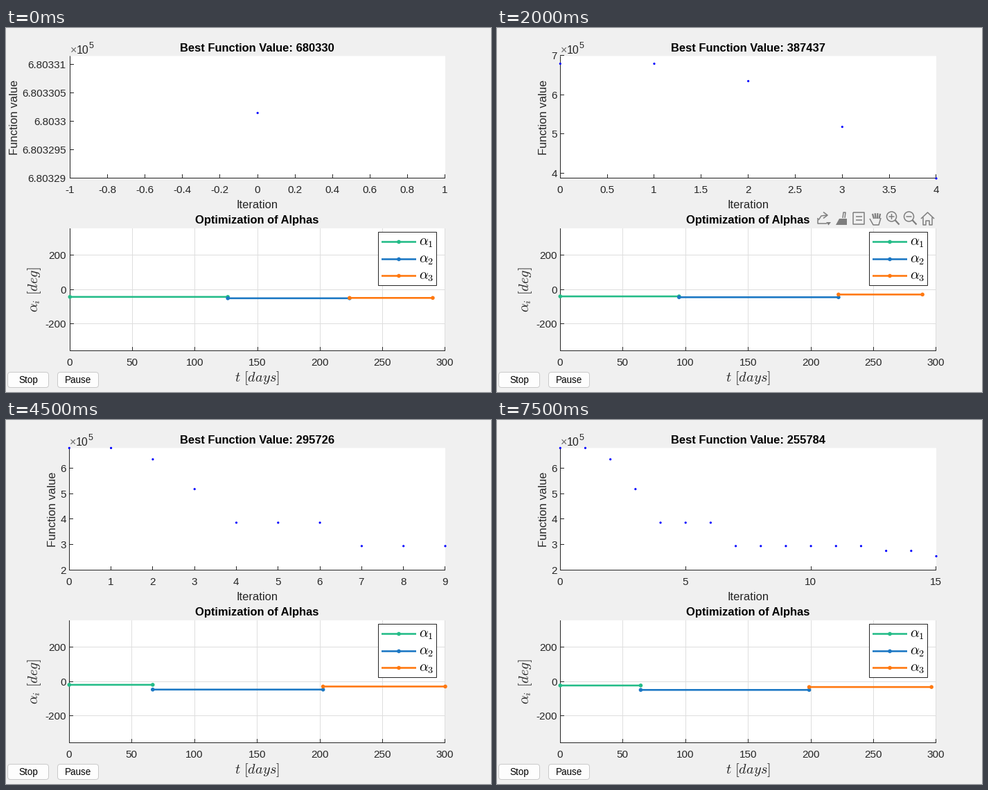
Animation, 700 px wide and 525 px high, one loop 8 s. Source, as a matplotlib script:

```python
import math

import matplotlib.pyplot as plt
import numpy as np
from matplotlib.animation import FuncAnimation
from matplotlib.patches import Circle, FancyBboxPatch, Polygon, Rectangle

plt.rcParams["font.family"] = "Liberation Sans"
plt.rcParams["mathtext.fontset"] = "cm"

W, H, DPI = 700, 525, 100
PT = 72 / DPI  # points per pixel
RIGHT, MID = 634, 362.5
INK, GRID, ICON = "#262626", "#dedede", "#7d7d7d"
COLORS = ("#24bc88", "#1c78c4", "#ff780f")
STEPS = (0.1, 0.2, 0.5, 1, 2, 5)
LAST = 15

# iteration of each improvement: new best value (x 1e5)
BEST = {0: 6.8033015, 2: 6.35928, 3: 5.19148, 4: 3.87437,
        7: 2.95726, 13: 2.76812, 15: 2.55784}

# key iterations: two switch days, end day, three angles
PLAN = {
    0: (126.2, 223.5, 290, -42, -50, -48),
    2: (116.6, 210.6, 289, -42, -49, -42),
    4: (94.8, 222, 289, -39, -44, -28),
    7: (66.6, 202.5, 300, -18, -46, -28),
    15: (64.2, 198.6, 296.2, -22, -48, -31),
}

fig = plt.figure(figsize=(W / DPI, H / DPI), dpi=DPI, facecolor="#f0f0f0")
ax = fig.add_axes((0, 0, 1, 1))


def improved(k):
    return max(i for i in BEST if i <= k)


def line(xs, ys, color=INK, lw=1, z=2):
    ax.plot(xs, ys, color=color, lw=lw * PT, solid_capstyle="butt",
            snap=False, zorder=z)


def dot(x, y, r, color):
    ax.add_patch(Circle((x, y), r, fc=color, ec="none", zorder=3))


def box(x, y, w, h, **kw):
    ax.add_patch(Rectangle((x, y), w, h, fc="white", snap=False, **kw))


def text(x, y, s, size, ha="center", color=INK, **kw):
    ax.text(x, y, s, fontsize=size * PT, ha=ha, va="baseline", color=color, **kw)


def vtext(x, y, s, size):
    text(x, y, s, size, rotation=90, rotation_mode="anchor")


def title(y, s):
    text(MID, y, s, 16.5, color="black", weight="bold")


def ticks(lo, hi, step):
    first = math.ceil(lo / step - 1e-6)
    last = math.floor(hi / step + 1e-6)
    return np.arange(first, last + 1) * step


def label(v):
    return f"{round(v, 9) + 0.0:.7g}"


def pixel(v):
    """Centre of the pixel that holds v."""
    return math.floor(v) + 0.5


def panel(k, top, bottom, xlim, xstep, ylim, ystep, grid=False):
    """Draw a plot area; return its x and y mappings and the label edge."""
    left = 92 if k < 2 else 91

    def px(v):
        return np.interp(v, xlim, (left + 0.3, RIGHT))

    def py(v):
        return np.interp(v, ylim, (bottom, top))

    box(left, top, RIGHT - left, bottom - top, ec="none", zorder=0)
    for v in ticks(*xlim, xstep):
        x = pixel(px(v) - 0.1)
        if grid:
            line([x, x], [top, bottom], GRID, z=1)
        line([x, x], [bottom - 6, bottom])
        text(px(v) - 0.5, bottom + 21, label(v), 15.2)
    edge = RIGHT
    for v in ticks(*ylim, ystep):
        y, s = pixel(py(v) - 0.5), label(v)
        if grid:
            line([left, RIGHT], [y, y], GRID, z=1)
        line([left, left + 6], [y, y])
        text(86.7, y + 5.5, s, 15.2, ha="right")
        edge = min(edge, 87 - sum(4.2 if c == "." else 8.4 for c in s))
    line([left + 0.5] * 2, [top, bottom])
    line([left, RIGHT], [bottom - 0.5] * 2)
    return px, py, edge


def x_range(k):
    if k == 0:
        return (-1, 1), 0.2
    step = 5 if k == LAST else next(s for s in STEPS if k <= 10 * s)
    return (0, math.ceil(k / step - 1e-6) * step), step


def y_range(k):
    lo, hi = BEST[improved(k)], BEST[0]
    if lo == hi:
        return (lo - 1.15e-5, hi + 1e-5), 5e-6
    step = next(s for s in STEPS if hi - lo < 5 * s)
    # wide ranges grow to a whole tick, downward once the best has halved
    if step >= 1:
        lo, hi = (math.floor(lo), hi) if lo < hi / 2 else (lo, math.ceil(hi))
    return (lo, hi), step


def value_plot(k):
    px, py, edge = panel(k, 40.4, 217, *x_range(k), *y_range(k))
    for i in range(k + 1):
        dot(px(i), py(BEST[improved(i)]), 1.6, "#0000ff")
    left = 92 if k < 2 else 91
    text(left + 0.5, 37, "×", 16, ha="left", color="#6a6a6a")
    text(left + 10, 37, "10", 16, ha="left")
    text(left + 28, 29, "5", 12.5, ha="left")
    title(34, f"Best Function Value: {BEST[improved(k)] * 1e5:.0f}")
    text(MID, 260, "Iteration", 16.5)
    vtext(edge - 7, 128.5, "Function value", 16.5)


def alpha_plot(k):
    px, py, _ = panel(k, 289, 466, (0, 300), 50, (-360, 360), 200, grid=True)
    now = [np.interp(improved(k), list(PLAN), col) for col in zip(*PLAN.values())]
    days = [0] + now[:3]
    for a, b, deg, color in zip(days, days[1:], now[3:], COLORS):
        xs, y = (px(a), px(b)), py(deg)
        line(xs, (y, y), color, 2.6, z=3)
        for x in xs:
            dot(x, y, 2.8, color)
    title(282, "Optimization of Alphas")
    text(MID, 510, r"$t\ [days]$", 20.3)
    vtext(46.5, 377, r"$\alpha_i\ [deg]$", 20.3)


def legend():
    box(537.5, 294.5, 84, 77, ec=INK, lw=PT, zorder=2.5)
    for i, color in enumerate(COLORS):
        y = pixel(308.5 + 24.5 * i)
        line((542, 592), (y, y), color, 2.6, z=3)
        dot(567, y, 2.8, color)
        text(595.5, y + 5, rf"$\alpha_{i + 1}$", 20.3, ha="left", color="black")


def button(x, s):
    ax.add_patch(FancyBboxPatch((x + 0.5, 496.5), 59, 22, fc="#fdfdfd", ec="#cacaca",
                                boxstyle="round,pad=0,rounding_size=4", lw=PT))
    text(x + 30.5, 512, s, 13.5, color="black")


def stroke(*pts, lw=1.5):
    line(*zip(*pts), color=ICON, lw=lw)


def shape(*pts):
    ax.add_patch(Polygon(pts, fc=ICON, ec="none"))


def lens(x, plus):
    ax.add_patch(Circle((x, 272), 7, fc="none", ec=ICON, lw=1.5 * PT))
    stroke((x + 5, 277), (x + 11, 283.5), lw=2.2)
    stroke((x - 4, 272), (x + 4, 272))
    if plus:
        stroke((x, 268), (x, 276))


def toolbar():
    # export
    stroke((463, 274), (463, 282), (476, 282))
    stroke((464, 277), (468, 271), (476, 270))
    stroke((471, 265.5), (477, 270), (471, 274.5))
    shape((475, 280), (482, 280), (478.5, 284.5))
    # brush
    stroke((499, 274), (500, 266), (503, 266), (502, 274))
    shape((494, 275), (505, 275), (505, 284), (489, 284))
    # data tip
    stroke((514, 266), (530, 266), (530, 283), (514, 283), (514, 266))
    for y in (272, 277):
        stroke((518, y), (527, y))
    # hand
    for i in range(4):
        x = 542 + 3.7 * i
        stroke((x, 268 - math.sin(i)), (544 + 2.5 * i, 275), lw=2.2)
    stroke((538, 275), (543, 284), (551, 284), (554, 274))
    lens(569.5, True)
    lens(594.5, False)
    # home
    stroke((612, 275), (621.5, 266), (631, 275))
    stroke((615, 273), (615, 284), (619, 284), (619, 278), (624, 278),
           (624, 284), (628, 284), (628, 273))


def draw(k):
    ax.clear()
    ax.set(xlim=(0, W), ylim=(H, 0))
    ax.axis("off")
    value_plot(k)
    alpha_plot(k)
    legend()
    button(2, "Stop")
    button(74, "Pause")
    if k == 4:
        toolbar()
    return []


anim = FuncAnimation(fig, draw, frames=LAST + 1, interval=500,
                     init_func=lambda: draw(0), repeat=True, repeat_delay=0)
plt.show()
```
